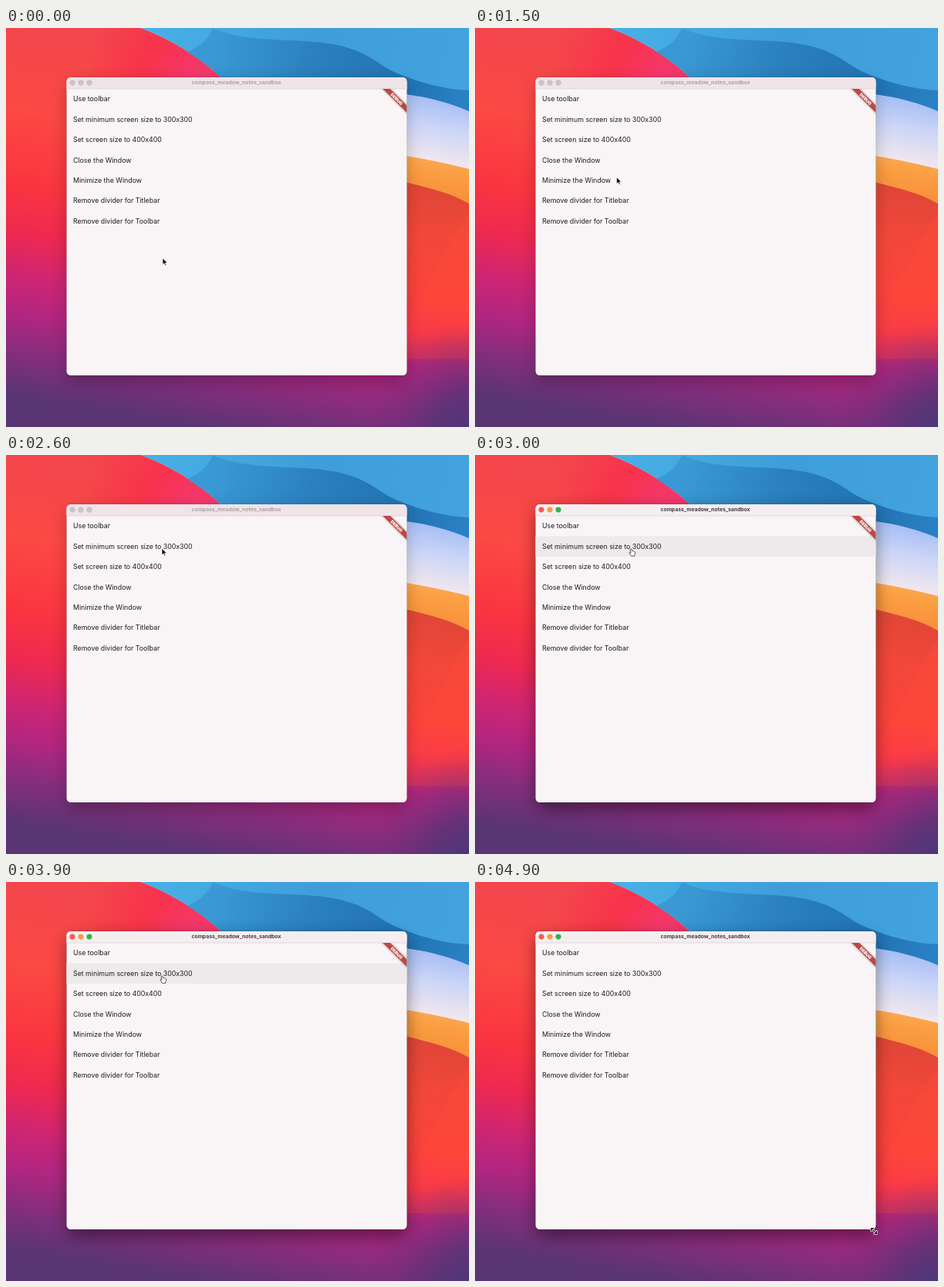
Write an HTML page that moves like this. It is 600 px wide and 518 px high and loops after 5000 ms.

```html
<!DOCTYPE html>
<html lang="en">
<head>
<meta charset="utf-8">
<title>Desktop window</title>
<style>
  html, body { margin: 0; width: 100%; height: 100%; overflow: hidden; }
  svg { display: block; width: 100%; height: 100%; }
  text { font-family: Inter, "Noto Sans", sans-serif; }
  .row { font-size: 8.8px; fill: #1f1b1d; }
  .title { font-size: 6.8px; font-weight: 700; text-anchor: middle; }
  .ribbon { font-size: 5.6px; font-weight: 900; fill: #fff; text-anchor: middle; }
</style>
</head>
<body>
<svg viewBox="0 0 600 518" preserveAspectRatio="none">
  <defs>
    <linearGradient id="dusk" gradientUnits="userSpaceOnUse" x1="340" y1="0" x2="253" y2="518">
      <stop offset=".08" stop-color="#f2464e"/>
      <stop offset=".3" stop-color="#fb4943"/>
      <stop offset=".48" stop-color="#fa3540"/>
      <stop offset=".6" stop-color="#ee2950"/>
      <stop offset=".71" stop-color="#cd2574"/>
      <stop offset=".8" stop-color="#b12680"/>
      <stop offset=".9" stop-color="#832e7c"/>
      <stop offset="1" stop-color="#593573"/>
    </linearGradient>
    <radialGradient id="rose" gradientUnits="userSpaceOnUse" cx="250" cy="75" r="150">
      <stop offset="0" stop-color="#f33a78"/>
      <stop offset=".5" stop-color="#f92e4c" stop-opacity=".8"/>
      <stop offset="1" stop-color="#f92e44" stop-opacity="0"/>
    </radialGradient>
    <linearGradient id="ember" gradientUnits="userSpaceOnUse" x1="575" y1="200" x2="545" y2="440">
      <stop offset="0" stop-color="#dc4636"/>
      <stop offset=".3" stop-color="#f2473a"/>
      <stop offset=".62" stop-color="#fb433c"/>
      <stop offset=".8" stop-color="#f7334e"/>
      <stop offset="1" stop-color="#d82766" stop-opacity="0"/>
    </linearGradient>
    <radialGradient id="corner" gradientUnits="userSpaceOnUse" cx="610" cy="530" r="150">
      <stop offset="0" stop-color="#46397a"/>
      <stop offset=".4" stop-color="#553476" stop-opacity=".8"/>
      <stop offset="1" stop-color="#7a2c78" stop-opacity="0"/>
    </radialGradient>
    <linearGradient id="amber" gradientUnits="userSpaceOnUse" x1="560" y1="165" x2="552" y2="215">
      <stop offset="0" stop-color="#fbab5c"/>
      <stop offset=".4" stop-color="#fb9f42"/>
      <stop offset="1" stop-color="#f8923c"/>
    </linearGradient>
    <linearGradient id="mist" gradientUnits="userSpaceOnUse" x1="565" y1="92" x2="550" y2="178">
      <stop offset="0" stop-color="#a6bdf5"/>
      <stop offset=".45" stop-color="#ccd6f7"/>
      <stop offset="1" stop-color="#f6e9ec"/>
    </linearGradient>
    <linearGradient id="sky" gradientUnits="userSpaceOnUse" x1="190" y1="0" x2="600" y2="60">
      <stop offset="0" stop-color="#47b0e6"/>
      <stop offset=".5" stop-color="#3f9ed9"/>
      <stop offset="1" stop-color="#43a3de"/>
    </linearGradient>
    <linearGradient id="sea" gradientUnits="userSpaceOnUse" x1="270" y1="20" x2="600" y2="100">
      <stop offset="0" stop-color="#3a99d4"/>
      <stop offset=".4" stop-color="#2a7fbd"/>
      <stop offset=".75" stop-color="#2273b2"/>
      <stop offset="1" stop-color="#2a82c6"/>
    </linearGradient>
    <filter id="blur" x="-20%" y="-20%" width="140%" height="140%"><feGaussianBlur stdDeviation="11"/></filter>
    <filter id="soft" x="-20%" y="-50%" width="140%" height="200%"><feGaussianBlur stdDeviation="1.4"/></filter>
    <clipPath id="frame"><rect x="78.5" y="64" width="441" height="387" rx="5.5"/></clipPath>
    <clipPath id="body"><rect x="78.5" y="79" width="441" height="372"/></clipPath>
  </defs>

  <g id="wallpaper">
    <rect width="600" height="518" fill="url(#dusk)"/>
    <rect width="600" height="300" fill="url(#rose)"/>
    <path d="M440 160L600 200V470H440Z" fill="url(#ember)"/>
    <path d="M600 240C575 270 555 330 519 374V430H600Z" fill="#ff4a38" opacity=".35"/>
    <rect x="440" y="360" width="160" height="158" fill="url(#corner)"/>
    <path d="M175 0C215 15 250 37 277 63C350 130 440 180 519 200.500C550 208 578 215 600 228V0Z" fill="url(#amber)"/>
    <path d="M175 0C215 15 250 37 277 63C350 120 440 155 519 166C550 171 575 177 600 183V0Z" fill="url(#mist)"/>
    <path d="M175 0C215 15 250 37 277 63L300 84L519 86C548 90 575 97 600 108V0Z" fill="url(#sky)"/>
    <path d="M268 0C305 17 350 14 400 18C470 24 478 48 510 60C542 73 572 80 600 81V108C575 97 548 90 519 86L300 84L277 63C265 50 250 41 235 31C250 25 262 15 268 0Z" fill="url(#sea)"/>
  </g>

  <rect id="shadow" x="80" y="72" width="438" height="387" rx="8" filter="url(#blur)"/>
  <rect x="78" y="63.500" width="442" height="388" rx="6" fill="#000" opacity=".2"/>
  <g clip-path="url(#frame)">
    <rect x="78" y="64" width="442" height="387" fill="#f9f5f7"/>
    <rect id="bar" x="78" y="64" width="442" height="15"/>
    <rect x="78" y="78.600" width="442" height=".7" fill="#d8ced2"/>
    <rect id="hover" x="78" width="442" height="26.450" fill="#edeaeb"/>
    <g id="lights" stroke-width=".5"></g>
    <text id="title" class="title" x="298.500" y="73.400">compass_meadow_notes_sandbox</text>
    <g id="rows"></g>
    <g clip-path="url(#body)">
      <g transform="translate(519.500 79) rotate(45)">
        <rect x="-30" y="15.400" width="60" height="6.600" fill="#000" opacity=".45" filter="url(#soft)"/>
        <rect x="-30" y="15.400" width="60" height="6.600" fill="#be4842"/>
        <text class="ribbon" x="0" y="20.750">DEBUG</text>
      </g>
    </g>
  </g>

  <g id="cursor" stroke-linejoin="round" stroke-linecap="round">
    <path id="arrow" d="M0 0V8.200L1.900 6.500L3.200 9.300L4.600 8.700L3.400 6L5.900 5.800Z" fill="#111" stroke="#fff" stroke-width=".6"/>
    <path id="hand" d="M-1.900 -4.300C-1.900 -5.500 -.3 -5.600 0 -4.400L.5 -2.300C1 -2.900 1.900 -2.700 2.100 -2C2.700 -2.400 3.400 -2.100 3.500 -1.400C4.200 -1.600 4.700 -1 4.600 -.2C4.500 1.300 4.200 2 3.600 2.900V4.300H-.5C-1 2.700 -2.600 1.700 -3.100 .2C-3.300 -.6 -2.300 -1 -1.700 -.3L-1.300 .1Z" fill="#fff" stroke="#222" stroke-width=".75"/>
    <g id="resize">
      <path d="M-2.800 -2.800L2.800 2.800M-3.500 -.3V-3.500H-.3M3.500 .3V3.500H.3" fill="none" stroke="#fff" stroke-width="2.400"/>
      <path d="M-2.800 -2.800L2.800 2.800M-3.500 -.3V-3.500H-.3M3.500 .3V3.500H.3" fill="none" stroke="#111" stroke-width="1.200"/>
    </g>
  </g>
</svg>
<script>
const LOOP = 5000, STEP = 100, FOCUS_AT = 3000;
const ROW_TOP = 79, ROW_H = 26.45;
const labels = [
  "Use toolbar",
  "Set minimum screen size to 300x300",
  "Set screen size to 400x400",
  "Close the Window",
  "Minimize the Window",
  "Remove divider for Titlebar",
  "Remove divider for Toolbar"
];
// Pointer stops: time, x, y
const stops = [
  [0, 203, 299],
  [500, 182, 361.5],
  [800, 182, 361.5],
  [1500, 183.5, 194],
  [1800, 183.5, 194],
  [2500, 202, 121.5],
  [4200, 202, 121.5],
  [4800, 517, 453],
  [5000, 517, 453]
];
const lightColors = ["#fd574e", "#fd9745", "#2fb344"];

const $ = id => document.getElementById(id);
const ease = p => p * p * (3 - 2 * p);
const show = (el, on) => el.setAttribute("visibility", on ? "visible" : "hidden");

function add(parent, tag, attrs, text = "") {
  const el = document.createElementNS("http://www.w3.org/2000/svg", tag);
  for (const key in attrs) el.setAttribute(key, attrs[key]);
  el.textContent = text;
  parent.appendChild(el);
  return el;
}

labels.forEach((label, i) =>
  add($("rows"), "text", { class: "row", x: 87, y: 95.2 + i * ROW_H }, label));
const lights = lightColors.map((_, i) =>
  add($("lights"), "circle", { cx: 86 + i * 11, cy: 71.1, r: 3.3 }));

function pointerAt(t) {
  const next = Math.max(1, stops.findIndex(s => s[0] > t));
  const [t0, x0, y0] = stops[next - 1];
  const [t1, x1, y1] = stops[next];
  const p = ease((t - t0) / (t1 - t0));
  return [x0 + (x1 - x0) * p, y0 + (y1 - y0) * p];
}

function draw(t) {
  const active = t >= FOCUS_AT;
  const [x, y] = pointerAt(t);
  const row = Math.floor((y - ROW_TOP) / ROW_H);
  const onRow = active && row >= 0 && row < labels.length && x < 519;
  const onCorner = x > 514 && y > 446;

  $("bar").setAttribute("fill", active ? "#f5eef0" : "#efe4e8");
  $("title").setAttribute("fill", active ? "#413b3e" : "#aca2a6");
  $("shadow").setAttribute("opacity", active ? 0.48 : 0.26);
  lights.forEach((light, i) => {
    light.setAttribute("fill", active ? lightColors[i] : "#cec3c7");
    light.setAttribute("stroke", active ? lightColors[i] : "#bdb2b6");
  });

  show($("hover"), onRow);
  if (onRow) $("hover").setAttribute("y", ROW_TOP + row * ROW_H);

  show($("arrow"), !onRow && !onCorner);
  show($("hand"), onRow);
  show($("resize"), onCorner);
  const dx = onRow ? 1 : 0, dy = onRow ? 5.5 : 0;
  $("cursor").setAttribute("transform", `translate(${x + dx} ${y + dy})`);
}

const start = performance.now();
function tick() {
  const t = (performance.now() - start) % LOOP;
  draw(Math.floor(t / STEP) * STEP);
  requestAnimationFrame(tick);
}
tick();
</script>
</body>
</html>
```
